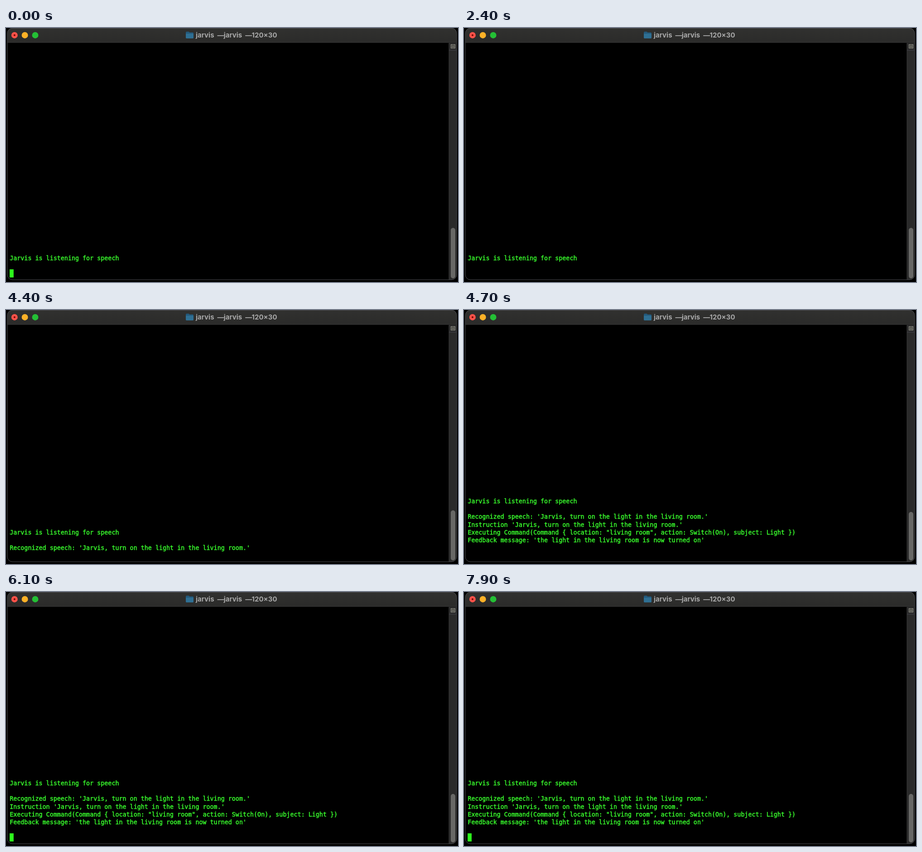
Animation of 998 by 561 pixels, one loop 8 s. Source, as an HTML page:

```html
<!DOCTYPE html>
<html lang="en">
<head>
<meta charset="utf-8">
<title>Terminal</title>
<style>
  html, body { margin: 0; width: 100%; height: 100%; overflow: hidden; background: #000; }
  svg { display: block; width: 998px; height: 561px; }

  .title { font: 700 15px Inter, sans-serif; fill: #a8a8a8; }
  .log {
    font: 13.37px "DejaVu Sans Mono", monospace;
    fill: #38fa2c; stroke: #38fa2c; stroke-width: .5px;
    white-space: pre;
  }

  .log, .heard, .reply, .thumb { animation: 8s step-end infinite; }
  .log { animation-name: scroll; }
  .heard { animation-name: heard; }
  .reply { animation-name: reply; }
  .thumb { animation-name: thumb; }
  .cursor { animation: blink 1s step-end infinite; }

  /* Speech is recognised at 3.1 s, the command runs at 4.7 s */
  @keyframes scroll {
    0% { transform: translateY(0); }
    38.75% { transform: translateY(-17.2px); }
    58.75%, 100% { transform: translateY(-86px); }
  }
  @keyframes heard {
    0% { visibility: hidden; }
    38.75%, 100% { visibility: visible; }
  }
  @keyframes reply {
    0% { visibility: hidden; }
    58.75%, 100% { visibility: visible; }
  }
  @keyframes thumb {
    0% { y: 441.5px; height: 111.5px; }
    38.75% { y: 442.5px; height: 110.5px; }
    58.75%, 100% { y: 446px; height: 107px; }
  }
  @keyframes blink {
    0% { opacity: 1; }
    40% { opacity: 0; }
    90%, 100% { opacity: 1; }
  }
</style>
</head>
<body>
<svg viewBox="0 0 998 561">
  <defs>
    <linearGradient id="bar" x2="0" y2="1">
      <stop stop-color="#31312f"/>
      <stop offset="1" stop-color="#2b2b2a"/>
    </linearGradient>
    <clipPath id="window"><rect x="3" y="0" width="992" height="556" rx="11"/></clipPath>
  </defs>
  <rect width="998" height="561"/>

  <g clip-path="url(#window)">
    <rect x="3" width="992" height="32" fill="url(#bar)"/>
    <rect x="3" y="31.5" width="992" height="1" fill="#3c3c3c"/>

    <rect x="978" y="33" width="17" height="523" fill="#2a2a2a"/>
    <rect x="977.5" y="33" width="1" height="523" fill="#3a3a3a"/>
    <rect x="978" y="48.5" width="17" height="1" fill="#45454f"/>
    <g fill="#3a3a36" stroke="#9c9c92">
      <rect x="982.5" y="36.5" width="9" height="8"/>
      <path d="M984 39.5h6M984 42h6"/>
    </g>
    <rect class="thumb" x="982" y="441.5" width="10" height="111.5" rx="5" fill="#686866"/>
  </g>
  <rect x="3" y=".5" width="992" height="555.5" rx="11" fill="none" stroke="#4d4e53"/>

  <circle cx="18.8" cy="15.9" r="7" fill="#ff5249"/>
  <circle cx="18.8" cy="15.9" r="2.1" fill="#7c0b08"/>
  <circle cx="41.6" cy="15.9" r="7" fill="#fdb127"/>
  <circle cx="64.5" cy="15.9" r="7" fill="#24bf35"/>

  <path d="M397 10q0-2 2-2h4.5l2 1.7h6.5q2 0 2 2v9.3q0 2-2 2h-13q-2 0-2-2z" fill="#23587a"/>
  <path d="M397 12.5h17v8.5q0 2-2 2h-13q-2 0-2-2z" fill="#2f6f93"/>
  <text class="title" y="21"><tspan x="419">jarvis</tspan><tspan x="463"> — </tspan><tspan x="480.7">jarvis</tspan><tspan x="524.7"> — </tspan><tspan x="542.5">120×30</tspan></text>

  <g class="log">
    <text x="8.2" y="513">Jarvis is listening for speech</text>
    <text class="heard" x="8.2" y="547.4">Recognized speech: 'Jarvis, turn on the light in the living room.'</text>
    <g class="reply">
      <text x="8.2" y="564.6">Instruction 'Jarvis, turn on the light in the living room.'</text>
      <text x="8.2" y="581.8">Executing Command(Command { location: "living room", action: Switch(On), subject: Light })</text>
      <text x="8.2" y="599">Feedback message: 'the light in the living room is now turned on'</text>
    </g>
  </g>
  <rect class="cursor" x="8" y="533" width="8.8" height="18" fill="#2dfe1c"/>
</svg>
</body>
</html>
```
